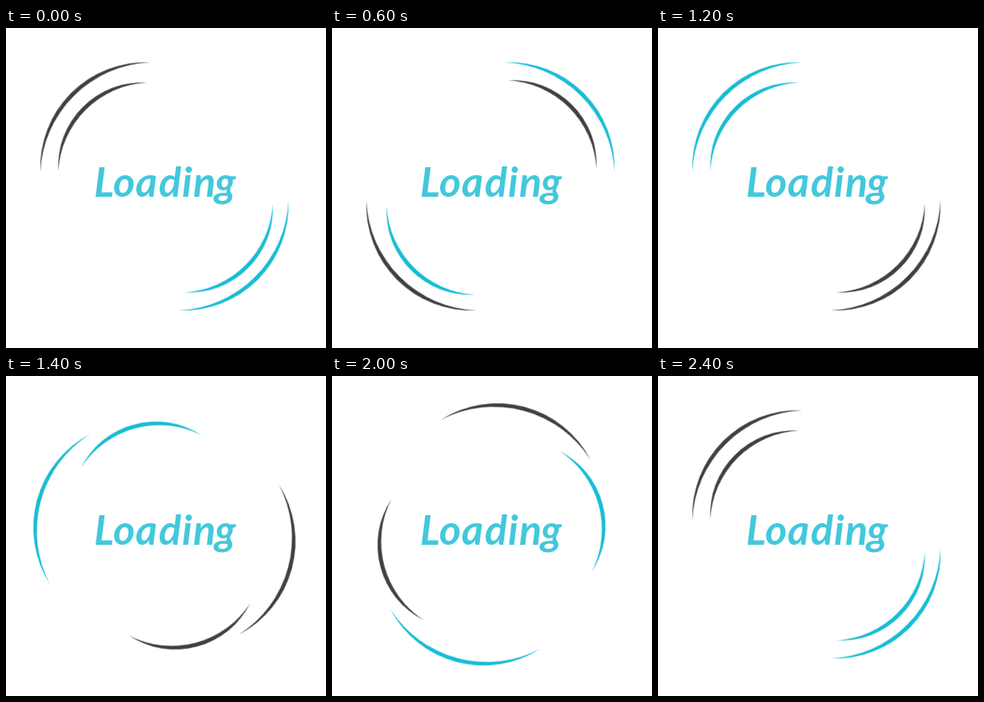
An HTML page for the animation above (2.5 s loop, 400x400 px).

```html
<!DOCTYPE html>
<html lang="en">
<head>
<meta charset="utf-8">
<title>Loading</title>
<style>
  html, body { margin: 0; width: 100%; height: 100%; overflow: hidden; background: #fff; }
  svg { display: block; width: 100vw; height: 100vh; }
  .dark { fill: #404042; }
  .cyan { fill: #18bcd4; }
  text { font: italic 700 52px Lato, "Open Sans", sans-serif; fill: #43c8dc; }
  /* 25 equal poses, 15 degrees apart, first and last alike */
  .spin { animation: turn 2500ms steps(25, jump-none) infinite; transform-origin: 0 0; }
  .back { animation-name: turn-back; }
  @keyframes turn { from { transform: rotate(0deg); } to { transform: rotate(360deg); } }
  @keyframes turn-back { from { transform: rotate(0deg); } to { transform: rotate(-360deg); } }
</style>
</head>
<body>
<svg viewBox="0 0 400 400">
  <defs>
    <path id="outer" d="M-97.2-122A131.4 131.4 0 0 1 97.2-122A143.3 143.3 0 0 0-97.2-122Z"/>
    <path id="inner" d="M-80.3-109.3A105 105 0 0 1 76.3-109.3A117.2 117.2 0 0 0-80.3-109.3Z"/>
  </defs>
  <g transform="translate(198 198)">
    <g class="spin back">
      <use href="#outer" class="dark" transform="rotate(-45)"/>
      <use href="#outer" class="cyan" transform="rotate(135)"/>
    </g>
  </g>
  <g transform="translate(199.4 199.4)">
    <g class="spin">
      <use href="#inner" class="dark" transform="rotate(-45)"/>
      <use href="#inner" class="cyan" transform="rotate(135)"/>
    </g>
  </g>
  <text x="110 134 162 191 220 234 261" y="211">Loading</text>
</svg>
</body>
</html>
```
